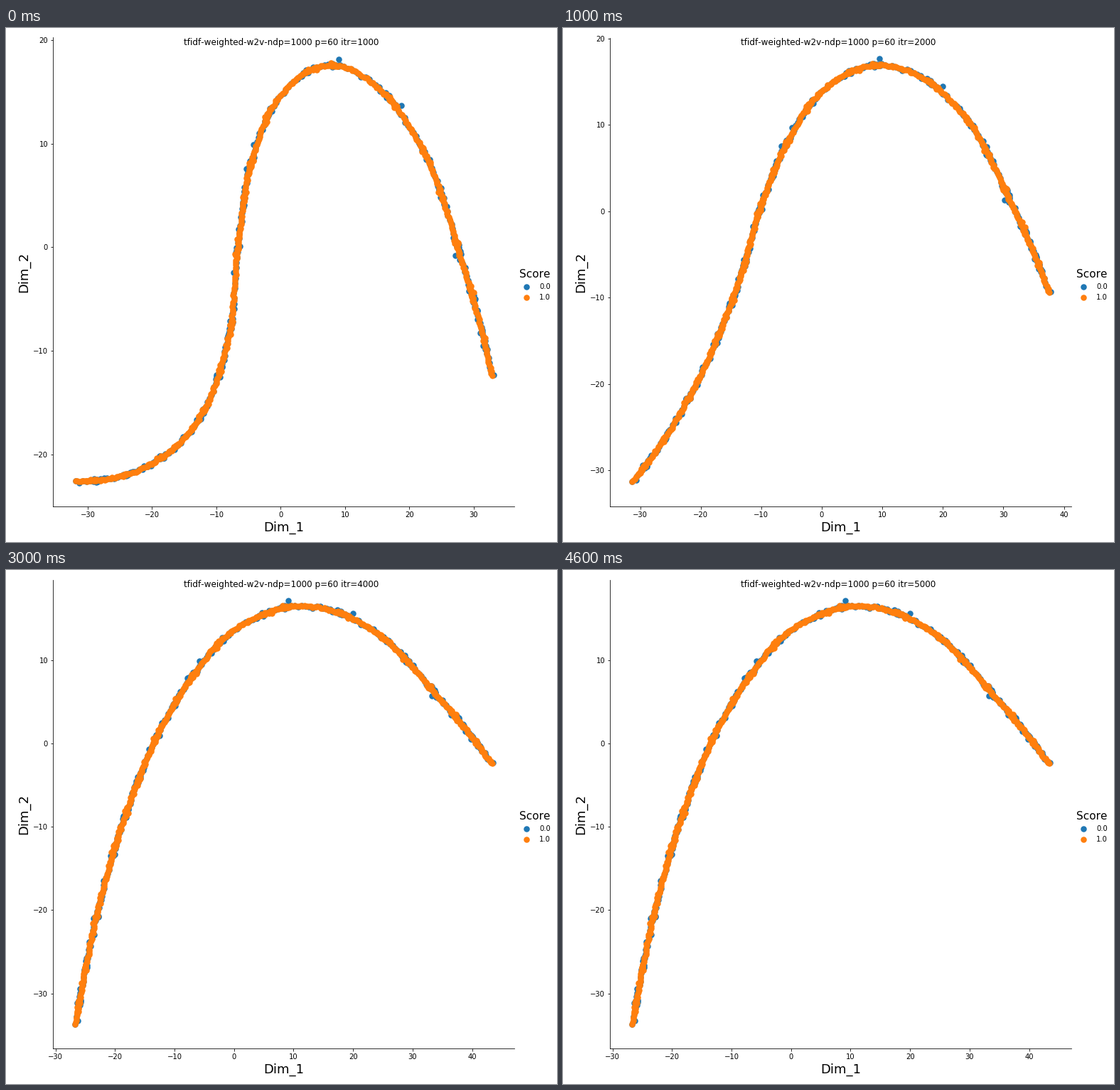
Write a matplotlib script that moves like this. It is 775x723 px and loops after 5 s.

```python
import numpy as np
import matplotlib.pyplot as plt
from matplotlib.animation import FuncAnimation
from matplotlib.ticker import MultipleLocator

W, H, DPI = 775, 723, 72
LEFT, RIGHT, TOP, BOTTOM = 66, 715, 13.5, 673
BLUE, ORANGE = "#1f77b4", "#ff7f0e"
plt.rcParams.update({"font.family": "DejaVu Sans", "text.kerning_factor": 6})

# Key points of the first and the settled curve, in stage pixels.
START = np.array([(97.5, 638), (236, 591), (267, 556), (310, 448), (327, 300),
                  (346, 185), (387, 94), (432, 57), (469, 53), (520, 81),
                  (575, 151), (638, 318), (683.5, 489)])
SETTLED = np.array([(98, 639), (133, 463), (148, 406), (179, 313), (215, 228),
                    (266, 144), (321, 84), (370, 59), (400, 51), (452, 55),
                    (515, 84), (603, 173), (683.5, 272.5)])
# Share of the first curve left at each stage: (left part, right part).
KEEP_X = [(1, 1), (.53, .68), (.16, .25), (0, 0)]
KEEP_Y = [(1, 1), (.29, .46), (.08, .166), (0, 0)]
XLIM = [(-35.41, 36.30), (-35.0, 41.23), (-31.82, 44.53), (-30.43, 47.10)]
YLIM = [(-25.05, 20.27), (-34.2, 20.12), (-36.53, 19.72), (-36.61, 19.64)]
# Stray blue dots: curve position, distance to the left of the curve.
STRAYS = np.array([(4.87, 4.5), (5.2, 4.5), (7.95, 8.5), (9.5, 7), (11, -6)])


def smoothstep(lo, hi, v):
    t = np.clip((v - lo) / (hi - lo), 0, 1)
    return t * t * (3 - 2 * t)


def knots(stage):
    """Key points at a stage; the right part settles later than the left."""
    i = np.arange(len(START))
    (xl, xr), (yl, yr) = KEEP_X[stage], KEEP_Y[stage]
    keep = np.c_[xl + (xr - xl) * smoothstep(3, 6, i),
                 yl + (yr - yl) * smoothstep(3, 12, i)]
    return SETTLED + keep * (START - SETTLED)


def cloud(rng, count, width, clumps, clump_width):
    """Curve positions and sideways offsets: an even strand plus clumps."""
    p = knots(1)
    dist = np.r_[0, np.cumsum(np.hypot(*np.diff(p, axis=0).T))]
    s = [np.linspace(0, dist[-1], count)]
    off = [rng.normal(0, width, count).clip(-2 * width, 2 * width)]
    for center in clumps * dist[-1]:
        s.append(rng.normal(center, 7, 8))
        off.append(rng.normal(0, clump_width, 8).clip(-3, 3))
    u = np.interp(np.concatenate(s), dist, np.arange(len(p)))
    return u, np.concatenate(off)


def place(p, u, off):
    """Hermite curve through the knots, shifted along its normal."""
    length = np.hypot(*np.diff(p, axis=0).T)
    tan = np.gradient(p, np.r_[0, np.cumsum(length)], axis=0, edge_order=2)
    i = np.minimum(u.astype(int), len(p) - 2)
    f, h = (u - i)[:, None], length[i][:, None]
    a, b, ta, tb = p[i], p[i + 1], tan[i] * h, tan[i + 1] * h
    pos = ((2*f**3 - 3*f**2 + 1) * a + (f**3 - 2*f**2 + f) * ta
           + (3*f**2 - 2*f**3) * b + (f**3 - f**2) * tb)
    d = ((6*f**2 - 6*f) * (a - b) + (3*f**2 - 4*f + 1) * ta
         + (3*f**2 - 2*f) * tb)
    normal = np.c_[d[:, 1], -d[:, 0]] / np.hypot(*d.T)[:, None]
    return pos + normal * off[:, None]


rng = np.random.default_rng(60)
clumps = (np.arange(18) + rng.uniform(.2, .8, 18)) / 18
u, off = cloud(rng, 220, 1.2, clumps, 1.7)
blue = np.r_[u, STRAYS[:, 0]], np.r_[off, STRAYS[:, 1]]
orange = cloud(rng, 480, 0.7, clumps, 1.5)

fig = plt.figure(figsize=(W / DPI, H / DPI), dpi=DPI, facecolor="white")
ax = fig.add_axes([LEFT / W, 1 - BOTTOM / H, (RIGHT - LEFT) / W,
                   (BOTTOM - TOP) / H])
ax.spines[["top", "right"]].set_visible(False)
ax.set_xlabel("Dim_1", fontsize=18)
ax.set_ylabel("Dim_2", fontsize=18)
ax.xaxis.set_major_locator(MultipleLocator(10))
ax.yaxis.set_major_locator(MultipleLocator(10))

canvas = fig.add_axes([0, 0, 1, 1])
canvas.axis("off")
canvas.set(xlim=(0, W), ylim=(H, 0))
dots = [canvas.scatter([], [], s=49, color=c, linewidths=1.5)
        for c in (BLUE, ORANGE)]
fig.legend(dots, ["0.0", "1.0"], title="Score", loc="center right",
           frameon=False, fontsize=10, title_fontsize=15.3, scatterpoints=1)
title = fig.suptitle("", fontsize=12)


def update(n):
    stage = min(n, len(KEEP_X) - 1)
    ax.set(xlim=XLIM[stage], ylim=YLIM[stage])
    p = knots(stage)
    for dot, (u, off) in zip(dots, (blue, orange)):
        dot.set_offsets(place(p, u, off))
    title.set_text(f"tfidf-weighted-w2v-ndp=1000 p=60 itr={(n + 1) * 1000}")
    return [*dots, title]


anim = FuncAnimation(fig, update, frames=5, interval=1000, repeat=True)
plt.show()
```
